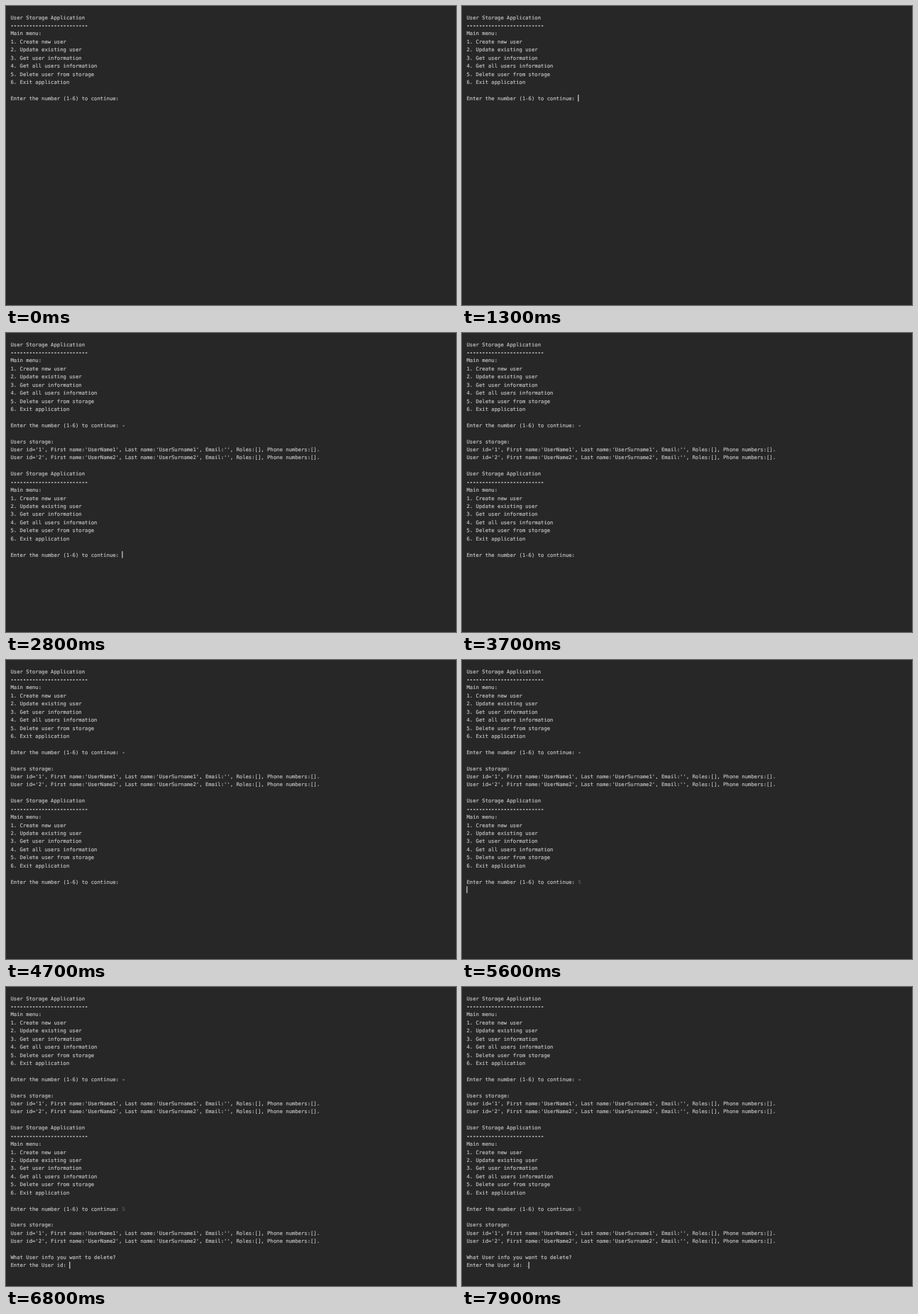
Recreate the animation shown at these times as an HTML page. Size 634 by 422 pixels, loop 8000 ms.

```html
<!DOCTYPE html>
<html lang="en">
<head>
<meta charset="utf-8">
<title>Console session</title>
<style>
  html, body { margin: 0; width: 100%; height: 100%; overflow: hidden; background: #272727; }
  svg { display: block; width: 634px; height: 422px; }
  text {
    font: 7.24px "DejaVu Sans Mono", monospace;
    fill: #c4c4c4;
    stroke: #c4c4c4;
    stroke-width: 0.16px;
    white-space: pre;
    text-rendering: geometricPrecision;
  }
  .dash { stroke-width: 0.6px; }
  .typed { fill: #656b62; stroke: none; }
  .typed.dash { fill: #858585; stroke: #858585; }
  .caret { fill: #d2d2d2; }
</style>
</head>
<body>
<svg id="screen" viewBox="0 0 634 422"></svg>
<script>
const LOOP = 8000;
const LEFT = 6.5, COLUMN = 4.3585, ROW = 11.42;
const screen = document.getElementById('screen');

const menu = [
  'User Storage Application',
  '-'.repeat(25),
  'Main menu:',
  '1. Create new user',
  '2. Update existing user',
  '3. Get user information',
  '4. Get all users information',
  '5. Delete user from storage',
  '6. Exit application',
  '',
  'Enter the number (1-6) to continue:'
];
const userLine = id => `User id='${id}', First name:'UserName${id}', ` +
  `Last name:'UserSurname${id}', Email:'', Roles:[], Phone numbers:[].`;
const users = ['Users storage:', userLine(1), userLine(2), ''];
const question = ['What User info you want to delete?', 'Enter the User id:'];

function add(parent, tag, attributes, content = '') {
  const node = document.createElementNS('http://www.w3.org/2000/svg', tag);
  for (const name in attributes) node.setAttribute(name, attributes[name]);
  node.textContent = content;
  parent.append(node);
  return node;
}

// Visible only inside the given [on, off] times, in ms.
function show(node, spans) {
  const frames = [{ offset: 0, opacity: 0 }];
  for (const [on, off] of spans) {
    frames.push({ offset: on / LOOP, opacity: 1 }, { offset: off / LOOP, opacity: 0 });
  }
  frames.push({ offset: 1, opacity: 0 });
  for (const frame of frames) frame.easing = 'steps(1, end)';
  node.animate(frames, { duration: LOOP, iterations: Infinity });
}

function write(parent, content, row, column = 0, style = '') {
  const dash = content.startsWith('-') ? ' dash' : '';
  return add(parent, 'text', {
    x: LEFT + column * COLUMN, y: 18.6 + row * ROW, class: style + dash
  }, content);
}

function block(lines, row, start) {
  const group = add(screen, 'g', {});
  lines.forEach((line, i) => write(group, line, row + i));
  if (start) show(group, [[start, LOOP]]);
}

function caret(row, column, spans) {
  show(add(screen, 'rect', {
    class: 'caret', x: LEFT - 0.1 + column * COLUMN, y: 11 + row * ROW,
    width: 1.2, height: 9.6
  }), spans);
}

block(menu, 0);
block([...users, ...menu], 12, 2800);
block([...users, ...question], 28, 5700);

// Typed answers: text, row, column, time
for (const [key, row, column, start] of [
  ['-', 10, 36, 2400],
  ['5', 26, 36, 5500],
  ['.', 33, 19, 7700]
]) show(write(screen, key, row, column, 'typed'), [[start, LOOP]]);

caret(10, 36, [[300, 800], [1300, 1800], [2300, 2400]]);
caret(10, 37, [[2400, 2600]]);
caret(11, 0, [[2600, 2800]]);
caret(26, 36, [[2800, 3300], [3800, 4400], [4900, 5500]]);
caret(26, 37, [[5500, 5600]]);
caret(27, 0, [[5600, 5700]]);
caret(33, 19, [[5700, 6200], [6800, 7400]]);
caret(33, 20, [[7700, LOOP]]);
</script>
</body>
</html>
```
